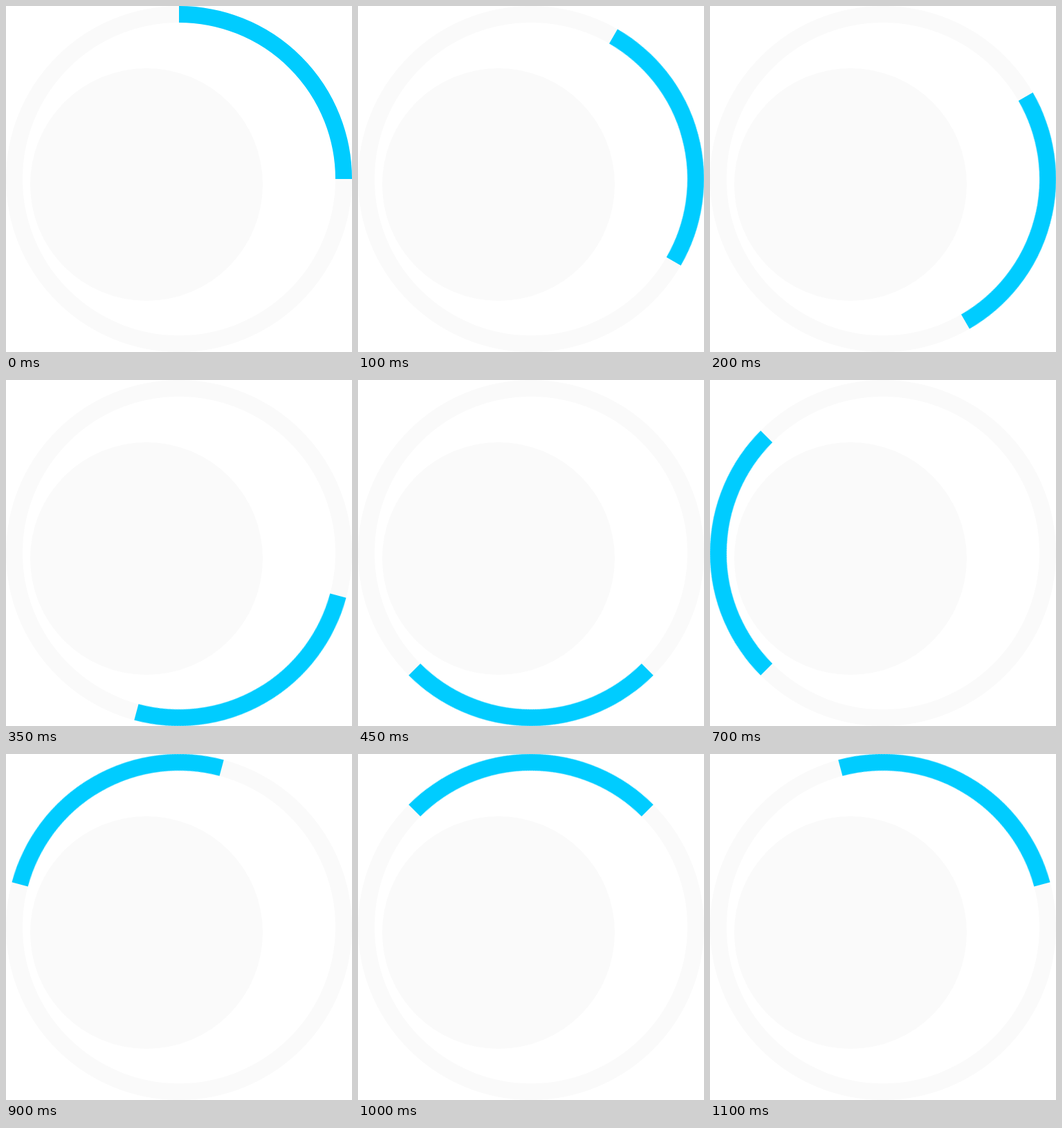
Recreate the animation shown at these times as an HTML page. Size 500 by 500 pixels, loop 1.15 s.

```html
<!DOCTYPE html>
<html lang="en">
<head>
<meta charset="utf-8">
<title>Loading ring</title>
<style>
  html, body { margin: 0; width: 100%; height: 100%; overflow: hidden; background: #fff; }
  svg { display: block; width: 100%; height: 100%; }
  .ring { fill: none; stroke: #fafafa; stroke-width: 24; }
  .badge { fill: #fafafa; }
  #arc { fill: none; stroke: #0cf; stroke-width: 24; transform-origin: 250px 250px; }
</style>
</head>
<body>
<svg viewBox="0 0 500 500">
  <circle class="badge" cx="203" cy="258" r="168"/>
  <circle class="ring" cx="250" cy="250" r="238"/>
  <path id="arc" d="M250 12A238 238 0 0 1 488 250"/>
</svg>
<script>
  const STEP = 50, COUNT = 23, JUMP = 12;
  const turn = deg => `rotate(${deg}deg)`;

  // 15° per step; the 180° position is skipped halfway round.
  document.getElementById('arc').animate([
    { offset: 0, transform: turn(0), easing: `steps(${JUMP}, end)` },
    { offset: JUMP / COUNT, transform: turn(180) },
    { offset: JUMP / COUNT, transform: turn(195), easing: `steps(${COUNT - JUMP}, end)` },
    { offset: 1, transform: turn(360) }
  ], { duration: STEP * COUNT, iterations: Infinity });
</script>
</body>
</html>
```
